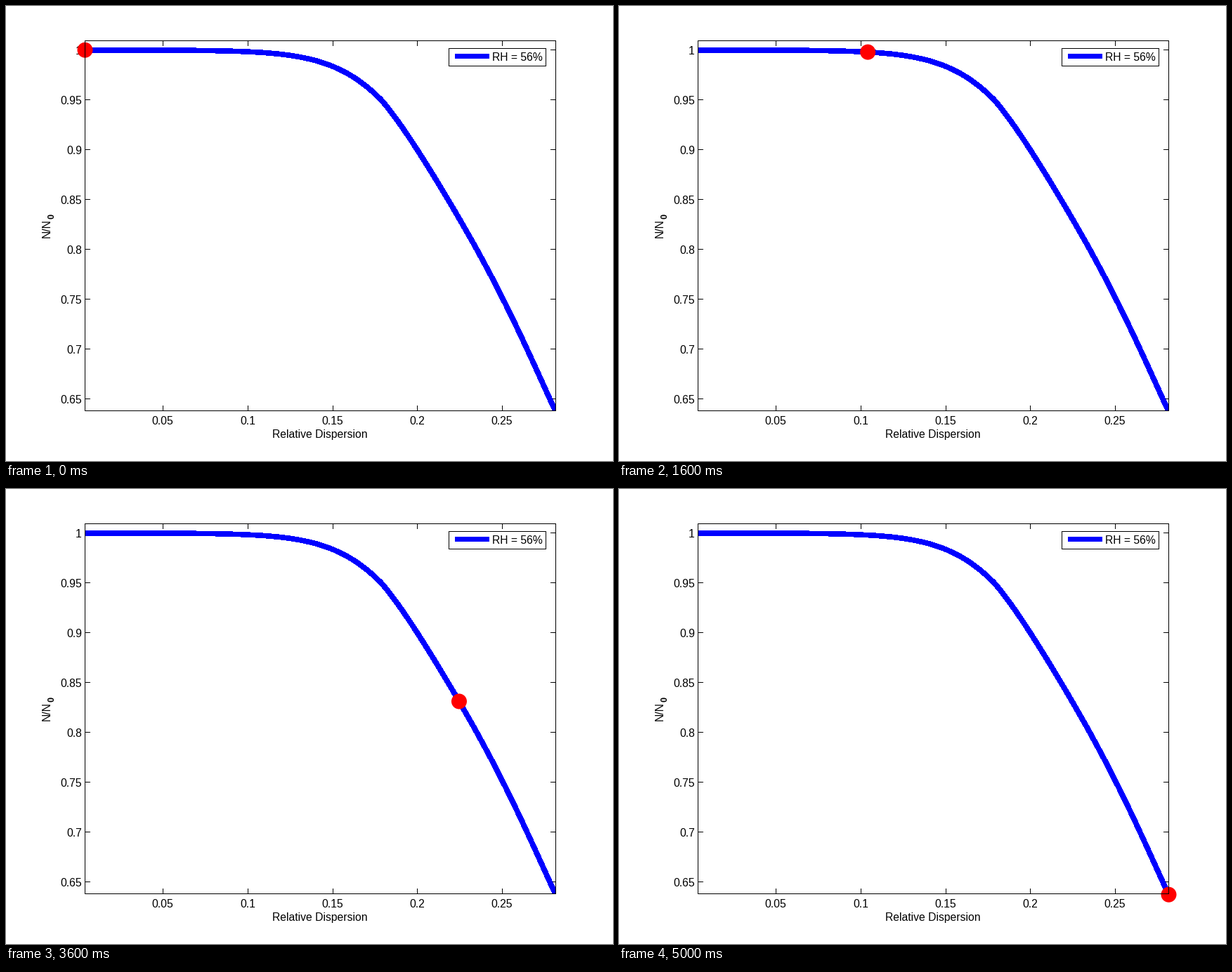
These frames come from a looping animation (864x648 px, 5200 ms). A matplotlib script:

```python
import numpy as np
import matplotlib.pyplot as plt
from matplotlib.animation import FuncAnimation
from matplotlib.patches import Circle, Rectangle

plt.rcParams["font.family"] = "Liberation Sans"

WIDTH, HEIGHT = 864, 648
LEFT, TOP, RIGHT, BOTTOM = 112, 49, 782, 576
FONT_PX = 15.8
FRAMES, STEP_MS, POINTS = 52, 100, 50


def curve_y(x):
    """Flat start bending into a steady fall, with a slight ripple on the slope."""
    fall = 106.8 * np.logaddexp(0, (x - 537) / 51)
    ripple = 6 * np.sin(2 * np.pi * np.clip((x - 535) / 240, 0, 1))
    return 62.7 + fall + ripple


def marker_path():
    """Marker x positions: an even pace with a burst of speed at the bend."""
    k = np.arange(POINTS - 1) + 0.5
    speed = 9.82 + 18 * np.exp(-((k - 15) / 5.91) ** 2)
    progress = np.concatenate([[0], np.cumsum(speed)]) / speed.sum()
    return LEFT + 0.5 + (RIGHT - LEFT) * progress


fig = plt.figure(figsize=(WIDTH / 72, HEIGHT / 72), dpi=72, facecolor="white")
ax = fig.add_axes([0, 0, 1, 1])
ax.set_xlim(0, WIDTH)
ax.set_ylim(HEIGHT, 0)
ax.axis("off")


def label(x, y, text, ha="center", size=FONT_PX, zorder=1, **style):
    ax.text(x, y, text, ha=ha, va="baseline", fontsize=size, color="black",
            zorder=zorder, **style)


def stroke(xs, ys, width=1, color="black", zorder=1):
    return ax.plot(xs, ys, color=color, lw=width, zorder=zorder,
                   solid_capstyle="butt", antialiased=False)[0]


def box(x0, y0, x1, y1, zorder, **style):
    return ax.add_patch(Rectangle((x0, y0), x1 - x0, y1 - y0, ec="black", lw=1,
                                  zorder=zorder, antialiased=False, **style))


frame = box(LEFT, TOP, RIGHT, BOTTOM, 5, fill=False)

for i in range(5):
    x = 223.2 + 120.7 * i
    stroke([x, x], [TOP, TOP + 7])
    stroke([x, x], [BOTTOM, BOTTOM - 7])
    label(x, 596, f"{0.05 * (i + 1):.2g}")

for i in range(8):
    y = 62 + 71 * i
    stroke([LEFT, LEFT + 7], [y, y])
    stroke([RIGHT, RIGHT - 7], [y, y])
    label(108, y + 7, f"{1 - 0.05 * i:.2g}", ha="right")

label(446.7, 615, "Relative Dispersion")
label(63, 330.5, "N/N", ha="left", rotation=90, rotation_mode="anchor")
label(68.5, 303, "0", ha="left", size=12.8, weight="bold",
      rotation=90, rotation_mode="anchor")

xs = np.linspace(LEFT, RIGHT + 1, 400)
curve = stroke(xs, curve_y(xs), 6.6, "blue", 2)
curve.set_clip_path(frame)

box(630, 60, 768, 85, 3, fc="white")
stroke([639, 687], [71, 71], 7, "blue", 4)
label(691.5, 78, "RH = 56%", ha="left", zorder=4)

path = marker_path()
dot = ax.add_patch(Circle((path[0], curve_y(path[0])), 11, fc="red", ec="none",
                          lw=0, zorder=3))


def update(n):
    # The first and last points are held for one extra step.
    x = path[min(max(n - 1, 0), POINTS - 1)]
    dot.center = (x, curve_y(x))
    return [dot]


anim = FuncAnimation(fig, update, frames=FRAMES, interval=STEP_MS,
                     repeat=True, repeat_delay=0, blit=False)
plt.show()
```
